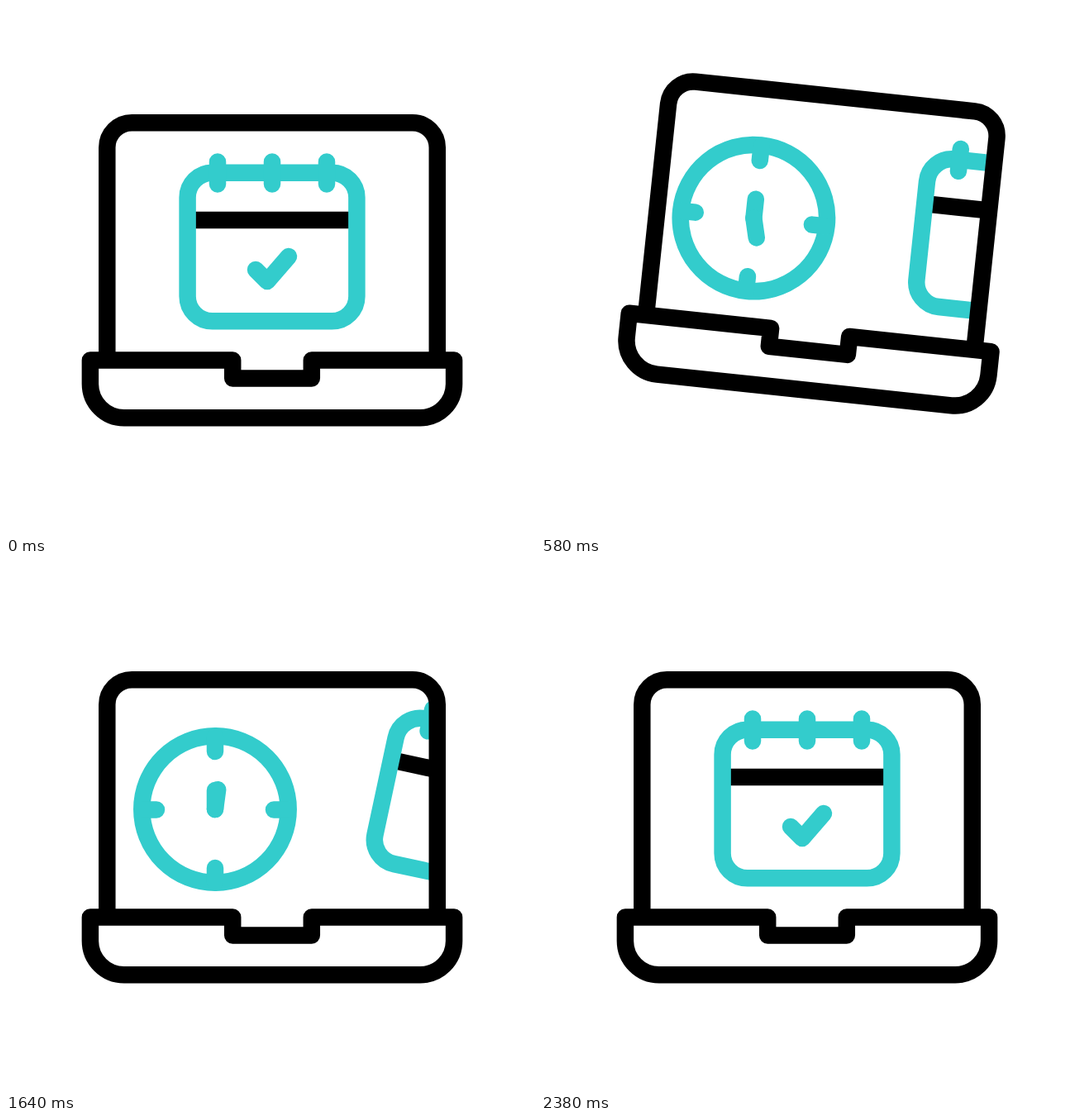
Animation of 640x640 px, one loop 2.4 s. Source, as an HTML page:

```html
<!DOCTYPE html>
<html lang="en">
<head>
<meta charset="utf-8">
<title>Laptop schedule</title>
<style>
  html, body { margin: 0; width: 100%; height: 100%; overflow: hidden; background: #fff; }
  svg { display: block; width: 100%; height: 100%; }
  .line { fill: none; stroke-width: 20.5; stroke-linecap: round; stroke-linejoin: round; }
  .teal { stroke: #33cccc; }
  .dark { stroke: #000; }
  .flat { stroke-linecap: butt; }
</style>
</head>
<body>
<svg viewBox="0 0 640 640">
  <defs>
    <clipPath id="screen"><rect x="122" y="141" width="400" height="287"/></clipPath>
  </defs>
  <g id="laptop">
    <g clip-path="url(#screen)">
      <!-- both icons are drawn around their own centre -->
      <g id="clock" class="line teal">
        <circle r="88.7"/>
        <path d="M0-88V-70M0 88V71M-88 .5H-71M88 .5H71"/>
        <path d="M0 0V-23"/>
        <path id="hour" d="M0 0V-24"/>
      </g>
      <g id="calendar">
        <path class="line dark flat" d="M-95-32.5H95"/>
        <g class="line teal">
          <rect x="-102.4" y="-89.8" width="204.8" height="179.6" rx="30"/>
          <path d="M-66-103V-76M0-103V-76M66-103V-76"/>
          <path d="M-20 27.5L-6 41.5L20 11.5"/>
        </g>
      </g>
    </g>
    <path class="line dark flat" d="M122.3 428V171.3a30 30 0 0 1 30-30H491.8a30 30 0 0 1 30 30V428"/>
    <path class="line dark" d="M101.9 428.4H274.2V450.4H369.8V428.4H542.1V457.3a41 41 0 0 1-41 41H142.9a41 41 0 0 1-41-41Z"/>
  </g>
</svg>
<script>
const LOOP = 2400, GAP = 307, LEAN = 12.1;
const [laptop, clock, calendar, hour] =
  ['laptop', 'clock', 'calendar', 'hour'].map(id => document.getElementById(id));

const part = (t, a, b) => Math.min(1, Math.max(0, (t - a) / (b - a)));
const ease = (t, a, b) => { const p = part(t, a, b); return p * p * (3 - 2 * p); };
const place = (el, x, y, turn) =>
  el.setAttribute('transform', `translate(${x} ${y}) rotate(${turn})`);

// speeds up gently, then turns at an even rate
function hourAngle(t) {
  const d = t - 920;
  return 222 + 0.202 * d + (d < 0 ? 1.08e-4 * d * d : 0);
}

function draw(t) {
  const hop = -39.8 * Math.sin(Math.PI * part(t, 180, 770));
  const tilt = 6.08 * (ease(t, 175, 600) - ease(t, 600, 780));
  laptop.setAttribute('transform', `translate(0 ${hop}) rotate(${tilt} 322 463)`);

  const out = ease(t, 160, 800), back = ease(t, 1400, 2180);
  const shift = GAP * (out - back);
  const lean = t > 1000 ? LEAN * (1 - ease(t, 1880, 2380)) : 0;
  place(calendar, 322 + shift, 291.5, lean);
  place(clock, 322.8 - GAP + shift, 298, 0);
  hour.setAttribute('transform', `rotate(${hourAngle(t)})`);
}

const start = performance.now();
function tick() {
  draw((performance.now() - start) % LOOP);
  requestAnimationFrame(tick);
}
draw(0);
requestAnimationFrame(tick);
</script>
</body>
</html>
```
